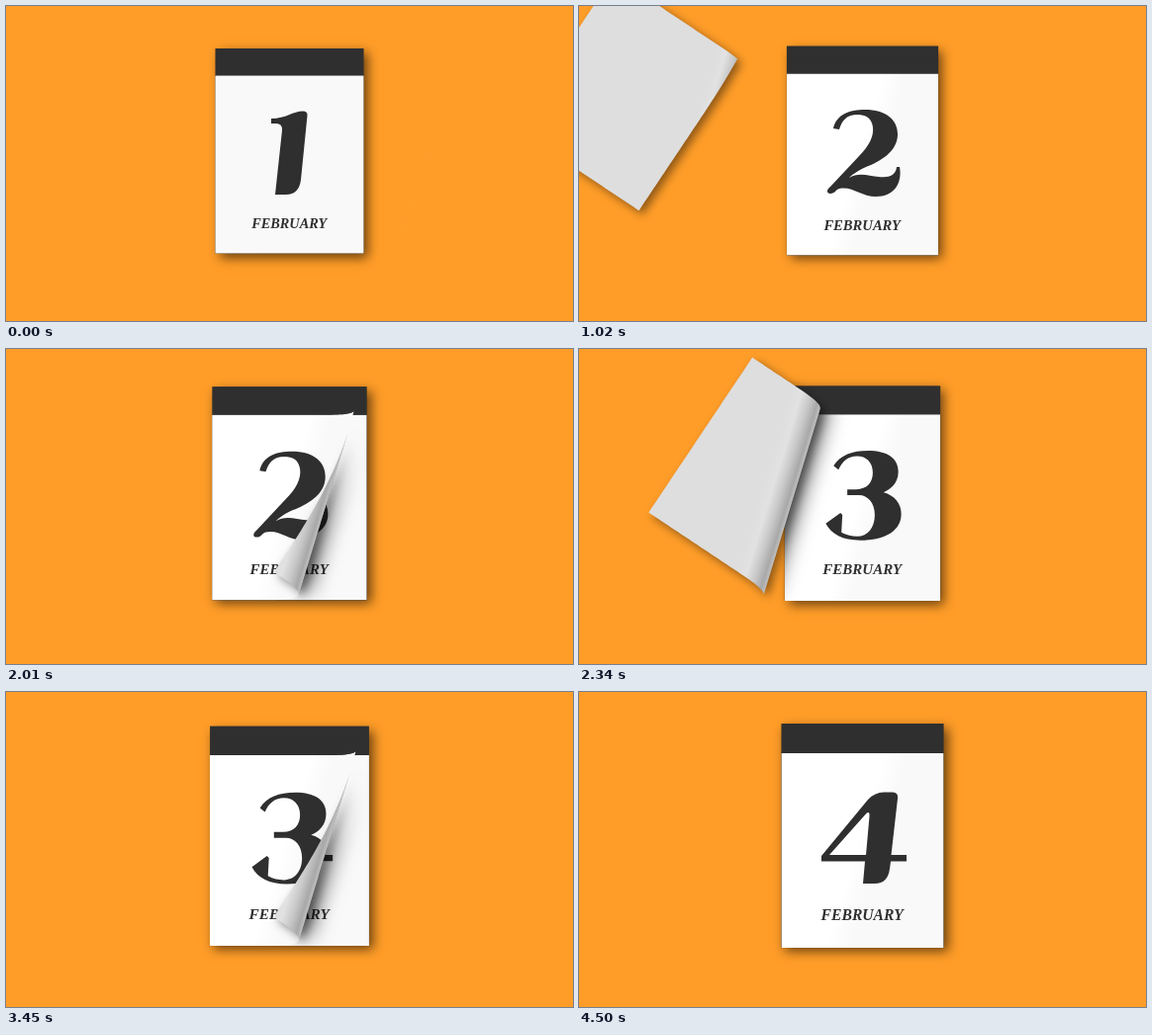
An HTML page with a canvas for the animation above (4530 ms loop, 573 by 319 pixels).

```html
<!DOCTYPE html>
<html lang="en">
<head>
<meta charset="utf-8">
<title>Tear-off calendar</title>
<style>
  html, body { margin: 0; width: 100%; height: 100%; overflow: hidden; background: #ff9d28; }
  canvas { display: block; }
</style>
</head>
<body>
<canvas id="stage" width="573" height="319"></canvas>
<script>
const ctx = document.getElementById('stage').getContext('2d');
const W = 573, H = 319, CX = 286.5, CY = 160;
const LOOP = 4530, TICK = 30, TURN = 45, LAST = 141;
const INK = '#2f2f2f';

// Calendar sheet at scale 1
const L = 211.5, R = 361.5, TOP = 43, FOLD = 70.5, BOTTOM = 250.5;

// Curl: n points across the roll, u runs along it
const NX = 0.957, NY = 0.29, RADIUS = 31;
const HALF = RADIUS * Math.PI / 2;

// Each digit: drawing scale, outline
const digits = [
  [1, 'M268 114C283 114 290 106.5 300 106.5Q305 106.5 304.5 111L298 176Q296 191 283 191L272 191L279 126Q279.5 119 273 119L268 119Z'],
  [1.021, 'M257 124C260 110 273 105 289 105C310 105 322 115 322 130C322 148 303 158 290 163C281 167 276 171 273 174C282 168 293 172 303 173C313 174 320 172 321 163L324 163C327 180 318 193 300 193C285 193 276 182 263 185C259 186 259 190 254 190C250 190 250 186 254 183L283 152C293 142 298 132 297 123C296 113 289 110 282 110C270 110 266 116 263 125Z'],
  [1.058, 'M257 118C264 107 276 102.5 292 102.5C312 102.5 323 110 323 124C323 136 315 142 308 145C319 148 326 156 326 167C326 184 310 194 284 194C266 194 255 188 249 177L264 166L266 168L265 186C270 189 276 190 281 190C292 190 299 181 299 168C299 156 292 148 283 148L271 148L271 142L280 142C291 142 297 135 297 125C297 114 290 108 281 108C272 108 266 113 262 122Z'],
  [1.094, 'M245 166L292 109Q299 101.5 308 101.5L317 101.5Q323 101.5 322 108L315.5 165L331 165L331 171.5L315 171.5L314 179Q312 194 299 194L287 194L289 171.5L245 171.5ZM253 165L289 124.5Q294 119 293.5 126L290 165Z']
].map(([k, d]) => [k, new Path2D(d)]);

// Points around the sheet's edge
const edge = [];
const corners = [[L, FOLD], [R, FOLD], [R, BOTTOM], [L, BOTTOM]];
corners.forEach(([x, y], i) => {
  const [x2, y2] = corners[(i + 1) % 4];
  for (let q = 0; q < 1; q += 1 / 48) edge.push([x + (x2 - x) * q, y + (y2 - y) * q]);
});

function zoom(k) {
  ctx.translate(CX, CY);
  ctx.scale(k, k);
  ctx.translate(-CX, -CY);
}

// Part of the sheet with roll distance between lo and hi, after curling at p0
function curled(p0, lo, hi) {
  const path = new Path2D();
  for (const [x, y] of edge) {
    const u = NX * y - NY * x;
    const d = Math.min(hi, Math.max(lo, NX * x + NY * y - p0));
    const p = p0 + (d < 0 ? d : d < 2 * HALF ? RADIUS * Math.sin(d / RADIUS) : 2 * HALF - d);
    path.lineTo(NX * p - NY * u, NY * p + NX * u);
  }
  path.closePath();
  return path;
}

function across(a, b, stops) {
  const g = ctx.createLinearGradient(NX * a, NY * a, NX * b, NY * b);
  stops.forEach(([at, color]) => g.addColorStop(at, color));
  return g;
}

function shadow(alpha, blur, dx, dy) {
  ctx.shadowColor = `rgba(0,0,0,${alpha})`;
  ctx.shadowBlur = blur;
  ctx.shadowOffsetX = dx;
  ctx.shadowOffsetY = dy;
}

function page(i, shape) {
  ctx.save();
  ctx.clip(shape);
  ctx.fillStyle = i ? across(314, 336, [[0, '#fff'], [1, '#f9f9f9']]) : '#f9f9f9';
  ctx.fill(shape);
  ctx.fillStyle = INK;
  ctx.font = 'italic bold 14.3px "Liberation Serif", "Times New Roman", serif';
  ctx.textAlign = 'center';
  ctx.fillText('FEBRUARY', 286.2, 225.3);
  const [k, path] = digits[i];
  zoom(1 / k);
  ctx.fill(path, 'evenodd');
  ctx.restore();
}

function turning(i, p0, sheet) {
  const back = curled(p0, HALF, 1e4);
  ctx.save();
  ctx.clip(sheet);
  shadow(0.55, 20, 9, 3);
  ctx.fillStyle = '#999';
  ctx.fill(back);
  ctx.restore();

  page(i, curled(p0, -1e4, HALF));

  ctx.save();
  shadow(0.45, 10, 4, 4);
  ctx.fillStyle = across(p0, p0 + RADIUS, [
    [0, '#dedede'], [0.3, '#e2e2e2'], [0.6, '#c8c8c8'], [0.87, '#a8a8a8'], [1, '#c0c0c0']
  ]);
  ctx.fill(back);
  ctx.restore();
}

function draw(time) {
  const tick = Math.floor(time % LOOP / TICK);
  const f = tick - Math.floor((tick + 3) / 16);   // one tick in sixteen is held
  const top = Math.min(3, Math.floor(f / TURN));
  const j = f - top * TURN;

  ctx.fillStyle = '#ff9d28';
  ctx.fillRect(0, 0, W, H);
  ctx.save();
  zoom(1 + 0.094 * f / LAST);

  ctx.save();
  shadow(0.6, 11, 4, 4);
  ctx.fillStyle = INK;
  ctx.fillRect(L, TOP, R - L, BOTTOM - TOP);
  ctx.restore();

  const sheet = new Path2D();
  sheet.rect(L, FOLD, R - L, BOTTOM - FOLD);
  if (top === 3) {
    page(3, sheet);
  } else {
    page(top + 1, sheet);
    turning(top, 419 - 5 * j - 3.25e-6 * j ** 5, sheet);
  }
  ctx.restore();
}

const start = performance.now();
function loop() {
  draw(performance.now() - start);
  requestAnimationFrame(loop);
}
loop();
</script>
</body>
</html>
```
